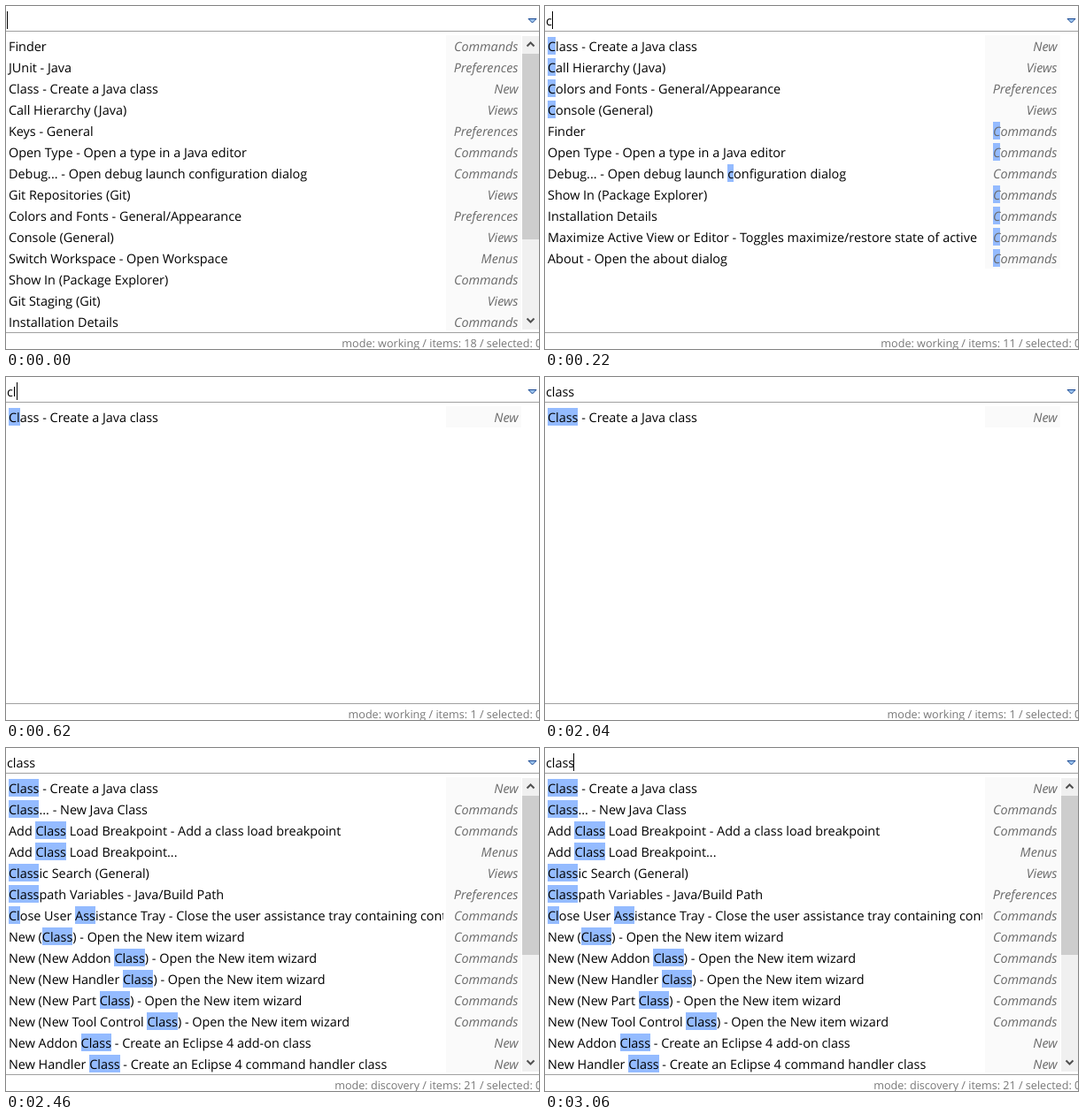
Animation of 602 by 388 pixels, one loop 3.48 s. Source, as an HTML page with a canvas:

```html
<!DOCTYPE html>
<html lang="en">
<head>
<meta charset="utf-8">
<title>Quick access</title>
<style>
html, body { margin: 0; width: 100%; height: 100%; overflow: hidden; background: #fff; }
canvas { display: block; }
</style>
</head>
<body>
<canvas id="stage" width="602" height="388"></canvas>
<script>
const ctx = document.getElementById("stage").getContext("2d");
const LOOP = 3480, WORD = "class";
const FAMILY = "'Open Sans', 'Noto Sans', sans-serif";
const PLAIN = "14.4px " + FAMILY, ITALIC = "italic " + PLAIN, SMALL = "12.6px " + FAMILY;
const KEY_TIMES = [220, 620, 820, 1220, 1440];
const CARET_X = [1, 8, 12, 20, 26, 32];

// One row per line: label|category, with matched letters in brackets.
const parse = text => text.trim().split("\n").map(row => row.split("|"));

const recent = parse(`
Finder|Commands
JUnit - Java|Preferences
Class - Create a Java class|New
Call Hierarchy (Java)|Views
Keys - General|Preferences
Open Type - Open a type in a Java editor|Commands
Debug... - Open debug launch configuration dialog|Commands
Git Repositories (Git)|Views
Colors and Fonts - General/Appearance|Preferences
Console (General)|Views
Switch Workspace - Open Workspace|Menus
Show In (Package Explorer)|Commands
Git Staging (Git)|Views
Installation Details|Commands`);

const firstLetter = parse(`
[C]lass - Create a Java class|New
[C]all Hierarchy (Java)|Views
[C]olors and Fonts - General/Appearance|Preferences
[C]onsole (General)|Views
Finder|[C]ommands
Open Type - Open a type in a Java editor|[C]ommands
Debug... - Open debug launch [c]onfiguration dialog|Commands
Show In (Package Explorer)|[C]ommands
Installation Details|[C]ommands
Maximize Active View or Editor - Toggles maximize/restore state of active|[C]ommands
About - Open the about dialog|[C]ommands`);

const discovered = parse(`
[Class] - Create a Java class|New
[Class]... - New Java Class|Commands
Add [Class] Load Breakpoint - Add a class load breakpoint|Commands
Add [Class] Load Breakpoint...|Menus
[Class]ic Search (General)|Views
[Class]path Variables - Java/Build Path|Preferences
[Cl]ose User [Ass]istance Tray - Close the user assistance tray containing conte|Commands
New ([Class]) - Open the New item wizard|Commands
New (New Addon [Class]) - Open the New item wizard|Commands
New (New Handler [Class]) - Open the New item wizard|Commands
New (New Part [Class]) - Open the New item wizard|Commands
New (New Tool Control [Class]) - Open the New item wizard|Commands
New Addon [Class] - Create an Eclipse 4 add-on class|New
New Handler [Class] - Create an Eclipse 4 command handler class|New`);

const singleMatch = n =>
  [[`[${"Class".slice(0, n)}]${"Class".slice(n)} - Create a Java class`, "New"]];

function rect(color, x, y, w, h) {
  ctx.fillStyle = color;
  ctx.fillRect(x, y, w, h);
}

function text(str, x, y, font, color) {
  ctx.font = font;
  ctx.fillStyle = color;
  ctx.fillText(str, x, y);
}

function widthOf(str, font) {
  ctx.font = font;
  return ctx.measureText(str).width;
}

function markedText(str, x, top, font, color) {
  str.split(/[[\]]/).forEach((part, i) => {
    const w = widthOf(part, font);
    if (i % 2) rect("#94bbff", Math.round(x), top + 2, Math.round(x + w) - Math.round(x), 20);
    text(part, x, top + 18, font, color);
    x += w;
  });
}

function drawRow([label, category], i) {
  const top = 33 + 24 * i;
  ctx.save();
  ctx.beginPath();
  ctx.rect(0, top, 494, 24);
  ctx.clip();
  markedText(label, 3, top, PLAIN, "#000");
  ctx.restore();
  rect("#fafafa", 497, top, 85, 24);
  const w = widthOf(category.replace(/[[\]]/g, ""), ITALIC);
  markedText(category, 578.5 - w, top, ITALIC, "#6a6a6a");
}

function chevron(y, dir) {
  ctx.beginPath();
  ctx.moveTo(588.5, y - 2 * dir);
  ctx.lineTo(592.5, y + 2 * dir);
  ctx.lineTo(596.5, y - 2 * dir);
  ctx.strokeStyle = "#505050";
  ctx.lineWidth = 2;
  ctx.stroke();
}

function scrollbar(thumb) {
  rect("#f0f0f0", 583, 34, 19, 332);
  rect("#cdcdcd", 583, 54, 19, thumb);
  chevron(43.5, -1);
  chevron(355.5, 1);
}

function dropArrow() {
  ctx.beginPath();
  ctx.moveTo(590, 14.5);
  ctx.lineTo(599, 14.5);
  ctx.lineTo(594.5, 19);
  ctx.closePath();
  ctx.fillStyle = "#9cc4ee";
  ctx.fill();
  ctx.strokeStyle = "#1d4b94";
  ctx.lineWidth = 1;
  ctx.stroke();
}

function draw(t) {
  const typed = KEY_TIMES.filter(k => t >= k).length;
  const found = t >= 2460;
  const rows = found ? discovered : typed > 1 ? singleMatch(typed) : typed ? firstLetter : recent;
  const count = found ? 21 : typed ? rows.length : 18;

  rect("#fff", 0, 0, 602, 388);
  text(WORD.slice(0, typed), 1, 22, PLAIN, "#000");
  if (t < 2040 || t >= 3060) rect("#000", CARET_X[typed], 6, 1, 20);
  dropArrow();
  rect("#a0a0a0", 0, 28, 602, 1);

  ctx.save();
  ctx.beginPath();
  ctx.rect(0, 30, 602, 337);
  ctx.clip();
  rows.forEach(drawRow);
  if (count > 14) scrollbar(found ? 180 : 210);
  ctx.restore();

  rect("#a0a0a0", 0, 369, 602, 1);
  const status = `mode: ${found ? "discovery" : "working"} / items: ${count} / selected: `;
  text(status + "0", 598 - widthOf(status, SMALL), 386, SMALL, "#787878");
}

ctx.textRendering = "geometricPrecision";
const start = performance.now();
function tick() {
  draw((performance.now() - start) % LOOP);
  requestAnimationFrame(tick);
}
tick();
</script>
</body>
</html>
```
